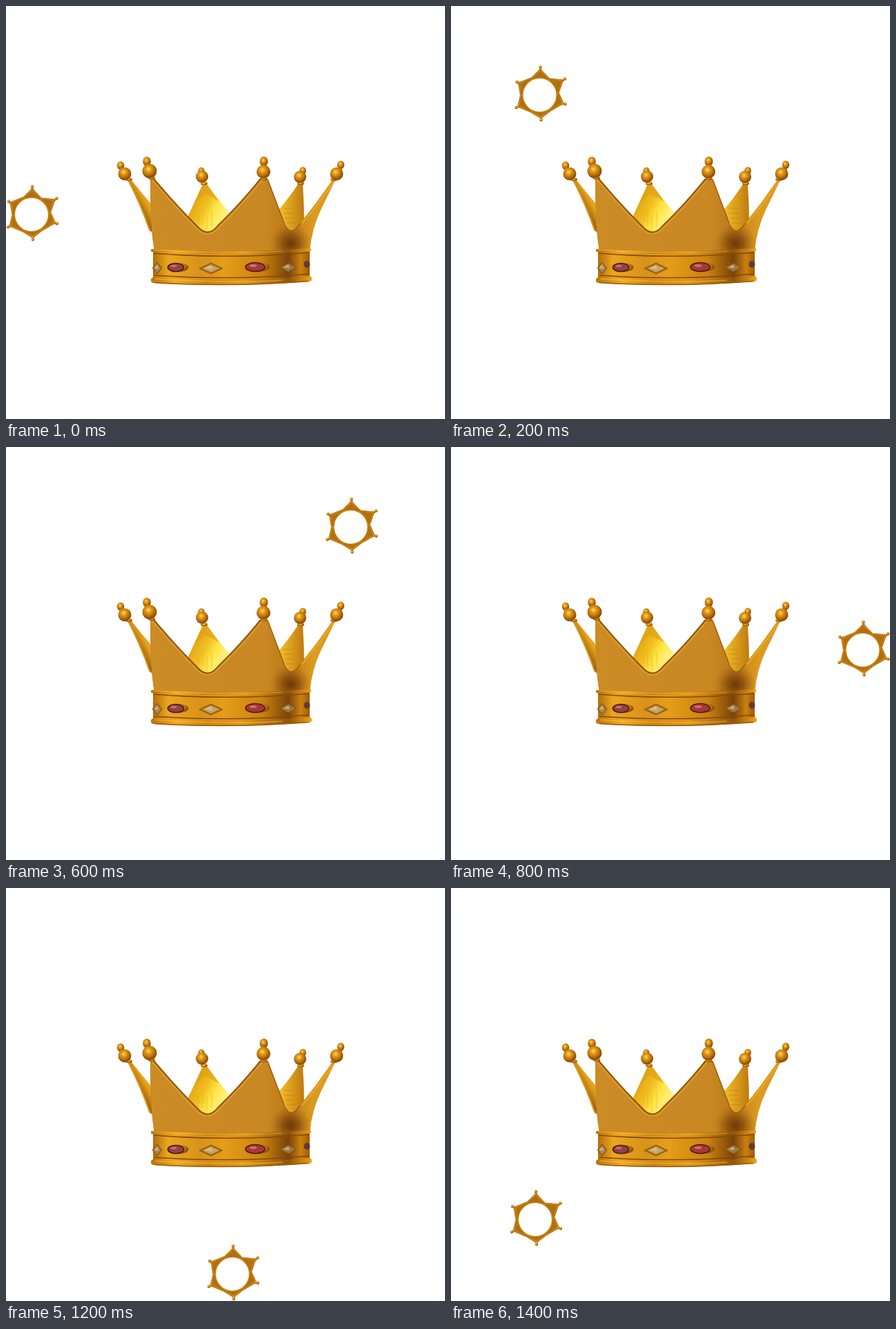
These frames come from a looping animation (636 px wide and 598 px high, 1600 ms). An HTML page:

```html
<!DOCTYPE html>
<html lang="en">
<head>
<meta charset="utf-8">
<title>Crown</title>
<style>
html, body { margin: 0; width: 100%; height: 100%; overflow: hidden; background: #fff; }
svg { display: block; width: 100%; height: 100%; }
</style>
</head>
<body>
<svg viewBox="0 0 636 598">
  <defs>
    <radialGradient id="ball" cx=".42" cy=".36" r=".68">
      <stop offset="0" stop-color="#ffdc68"/><stop offset=".25" stop-color="#e9a01a"/>
      <stop offset=".65" stop-color="#b06a0b"/><stop offset=".85" stop-color="#8a4a06"/>
      <stop offset="1" stop-color="#b87412"/>
    </radialGradient>
    <linearGradient id="face" x1="209" x2="445" y1="0" y2="0" gradientUnits="userSpaceOnUse">
      <stop offset="0" stop-color="#cb8b25"/><stop offset=".7" stop-color="#c98824"/>
      <stop offset=".86" stop-color="#bd7a18"/><stop offset="1" stop-color="#dc9a20"/>
    </linearGradient>
    <linearGradient id="glow" x1="0" x2="0" y1="315" y2="354" gradientUnits="userSpaceOnUse">
      <stop offset="0" stop-color="#e9a21b" stop-opacity="0"/>
      <stop offset=".65" stop-color="#e8a01c" stop-opacity=".65"/>
      <stop offset="1" stop-color="#c47c0d" stop-opacity=".9"/>
    </linearGradient>
    <radialGradient id="dark" cx="412" cy="344" r="30" gradientUnits="userSpaceOnUse">
      <stop offset="0" stop-color="#693408" stop-opacity=".95"/>
      <stop offset=".4" stop-color="#7a4209" stop-opacity=".7"/>
      <stop offset="1" stop-color="#9a5c10" stop-opacity="0"/>
    </radialGradient>
    <linearGradient id="band" x1="212" x2="441" y1="0" y2="0" gradientUnits="userSpaceOnUse">
      <stop offset="0" stop-color="#b06c08"/><stop offset=".1" stop-color="#eca61e"/>
      <stop offset=".3" stop-color="#d8921a"/><stop offset=".45" stop-color="#e69d18"/>
      <stop offset=".7" stop-color="#c9820f"/><stop offset=".86" stop-color="#7a420a"/>
      <stop offset=".94" stop-color="#ca8110"/><stop offset="1" stop-color="#9a5a08"/>
    </linearGradient>
    <linearGradient id="rim" x1="210" x2="442" y1="0" y2="0" gradientUnits="userSpaceOnUse">
      <stop offset="0" stop-color="#bd7409"/><stop offset=".16" stop-color="#f0aa24"/>
      <stop offset=".35" stop-color="#cd8410"/><stop offset=".58" stop-color="#e09818"/>
      <stop offset=".86" stop-color="#945408"/><stop offset="1" stop-color="#eca21b"/>
    </linearGradient>
    <linearGradient id="back" x1="270" x2="318" y1="280" y2="306" gradientUnits="userSpaceOnUse">
      <stop offset="0" stop-color="#e0a212"/><stop offset=".4" stop-color="#f2c022"/>
      <stop offset=".65" stop-color="#ffe545"/><stop offset="1" stop-color="#fff38a"/>
    </linearGradient>
    <linearGradient id="back2" x1="398" x2="434" y1="0" y2="0" gradientUnits="userSpaceOnUse">
      <stop offset="0" stop-color="#f0bc28"/><stop offset=".5" stop-color="#d7981a"/>
      <stop offset="1" stop-color="#b97510"/>
    </linearGradient>
    <linearGradient id="side" x1="180" x2="204" y1="300" y2="286" gradientUnits="userSpaceOnUse">
      <stop offset="0" stop-color="#d08b13"/><stop offset=".5" stop-color="#9c5d08"/>
      <stop offset="1" stop-color="#e6a31c"/>
    </linearGradient>
  </defs>

  <g id="crown">
    <!-- far spikes -->
    <path d="M285 258L262 308L293 334L326 302Q306 279 291 258Z" fill="url(#back)"/>
    <path d="M285 258Q293 254 291 258L309 283Q296 276 288 272L274 284Z" fill="#dc9f16" opacity=".6"/>
    <path d="M279 298V313M285 293V318M291 303V325M298 297V319" stroke="#dba81b" opacity=".5"/>
    <path d="M423 258Q410 278 395 295L410 328L432 318Q432 288 430 258Z" fill="url(#back2)"/>
    <path d="M402 293H416M402 300H417M404 307H418M406 314H420" stroke="#b67c13" stroke-width="1.5" opacity=".4"/>
    <path d="M176 252L181 251Q196 270 212 289V328L207 324Q195 288 176 252Z" fill="url(#side)"/>
    <path d="M178 253Q195 287 209 326" fill="none" stroke="#d9941a" stroke-width="2"/>

    <!-- front wall -->
    <path id="wall" fill="url(#face)" d="M209 248L214 249Q245 287 276 318Q292 337 307 318Q340 286 368 250L379 250Q392 285 404 317Q413 335 426 315Q451 284 473 252L477 252L456 295Q443 322 440 354Q325 364 215 354Q209 325 209 248Z"/>
    <path fill="url(#glow)" d="M210 312L270 313Q293 344 314 312L402 313Q414 337 428 313L446 313Q441 332 440 354Q325 364 215 354Z"/>
    <use href="#wall" style="fill:url(#dark)"/>
    <path fill="url(#dark)" d="M380 318H406Q413 335 426 315L440 325V354L380 360Z"/>
    <path d="M379 251Q392 285 404 317Q413 335 426 315" fill="none" stroke="#a06010" stroke-width="1.6"/>
    <path d="M213 249Q245 287 276 318Q292 337 307 318Q340 286 369 250" fill="none" stroke="#8f550b" stroke-width="2"/>
    <path d="M212 252Q243 289 274 320Q292 340 309 320Q342 288 371 252" fill="none" stroke="#e4a42a" stroke-width="1.2"/>
    <path d="M474 256Q453 286 429 315" fill="none" stroke="#efb02a" stroke-width="1.3"/>

    <!-- band -->
    <path d="M213 353Q326 363 440 353L440 394Q326 406 213 397Z" fill="url(#band)"/>
    <path d="M214 358Q326 367 439 357" fill="none" stroke="#854b06" stroke-width="1.6"/>
    <path d="M212 354Q326 361 440 353" fill="none" stroke="url(#rim)" stroke-width="4.4" stroke-linecap="round"/>
    <path d="M214 353Q326 360 400 355" fill="none" stroke="#ffd057" opacity=".45"/>
    <path d="M215 390Q326 398 438 388" fill="none" stroke="#85480a" stroke-width="1.5"/>
    <path d="M214 397Q326 404 439 395" fill="none" stroke="url(#rim)" stroke-width="8" stroke-linecap="round"/>
    <path d="M216 395Q326 402 400 397" fill="none" stroke="#ffcd50" opacity=".45" stroke-width="1.5"/>
    <path d="M215 400.5Q326 407.5 438 398.5" fill="none" stroke="#985805" stroke-width="1.5"/>

    <g id="gems"></g>
    <ellipse cx="436" cy="374" rx="4.5" ry="5" fill="#6b3a20"/>
    <ellipse cx="436" cy="374" rx="2" ry="3.4" fill="#573956"/>
  </g>
  <g id="tips"></g>

  <g id="mini">
    <path id="star" fill="#c98316" stroke="#bb7510" stroke-linejoin="round"/>
    <path id="petals" fill="#8f520b" opacity=".4"/>
    <circle cx="37" cy="44" r="24.6" fill="#fff" stroke="#c98616" stroke-width="1.4"/>
    <g id="beads"></g>
  </g>
</svg>
<script>
const $ = id => document.getElementById(id);
const ball = (x, y, rx, ry = rx) =>
  `<ellipse cx="${x}" cy="${y}" rx="${rx}" ry="${ry}" fill="url(#ball)"/>`;
const poly = pts => "M" + pts.map(p => p.join()).join("L") + "Z";

// Finials: neck x, y; large ball x, y, r; small ball x, y, r
$("tips").innerHTML = [
  [287, 258, 284, 247, 9, 283, 239, 4.7],
  [427, 258, 426, 247.5, 9, 430, 238.5, 4.8],
  [178, 252, 172, 243, 9.5, 166, 231, 5.3],
  [475, 252, 479, 243, 9.5, 485, 230, 5.2],
  [211, 250, 208, 239, 10.5, 204, 225, 5.8],
  [373.5, 251, 373, 240, 10, 373.5, 225, 6]
].map(([nx, ny, x, y, r, sx, sy, s]) =>
  ball(nx, ny - 1, 5, 2.5) + ball(sx, sy, s, s * 1.15) +
  ball((x + sx) / 2, (y + sy) / 2, s * .9, 2.5) + ball(x, y, r)).join("");

const ruby = (x, y, rx, ry, color) =>
  ball(x + 5, y, rx + 2, ry + .5) +
  `<ellipse cx="${x}" cy="${y}" rx="${rx}" ry="${ry}" fill="${color}" stroke="#4d2010" stroke-width="1.7"/>
   <ellipse cx="${x - 3}" cy="${y - 2}" rx="${rx * .4}" ry="${ry * .3}" fill="#c9706a"/>`;
const diamond = (x, y, w, h, color) => {
  const shape = k => poly([[x - w * k, y], [x, y - h * k], [x + w * k, y], [x, y + h * k]]);
  return `<path d="${shape(1)}" fill="#a3731e" stroke="#7a4a0c" stroke-width=".8"/>
    <path d="${shape(.7)}" fill="${color}"/>
    <path d="${poly([[x - w * .6, y], [x, y - h * .6], [x + 2, y + 1]])}" fill="#e6cfa0" opacity=".6"/>`;
};
$("gems").innerHTML = diamond(219, 379.5, 7, 8.5, "#a8865e") + ruby(246, 378.5, 11.5, 6, "#93404a") +
  diamond(297, 380, 17, 8, "#c8a468") + ruby(361, 378, 14, 6.5, "#a83638") +
  diamond(409, 378.5, 12, 6.5, "#93795a");

// Small crown seen from above
const cx = 37, cy = 44;
const tips = [[38, 3.5], [73.5, 20.5], [74, 57], [39, 80], [3, 62], [4, 25]];
const polar = (deg, r) => [cx + r * Math.cos(deg * Math.PI / 180), cy - r * Math.sin(deg * Math.PI / 180)];
const notches = [59, 7, -55, -118, 181, 115].map(a => polar(a, 28));
const toward = ([x, y], k) => [cx + (x - cx) * k, cy + (y - cy) * k];
$("star").setAttribute("d", poly(tips.flatMap((p, i) => [toward(p, .94), notches[i]])));
$("petals").setAttribute("d", tips.map((p, i) =>
  poly([toward(p, .85), toward(notches[i], .96), toward(notches[(i + 5) % 6], .96)])).join(""));
$("beads").innerHTML = tips.map(p =>
  ball(...toward(p, .92), 2) + ball(...p, 2.2)).join("");

// The small crown jumps clockwise around the stage
const stops = [[0, 258], [91.5, 85], [285, 0], [462.5, 72], [559.5, 250], [479, 434], [291, 515], [85, 436]];
function draw(now) {
  $("mini").setAttribute("transform", `translate(${stops[Math.floor(now / 200) % 8]})`);
  requestAnimationFrame(draw);
}
draw(0);
</script>
</body>
</html>
```
